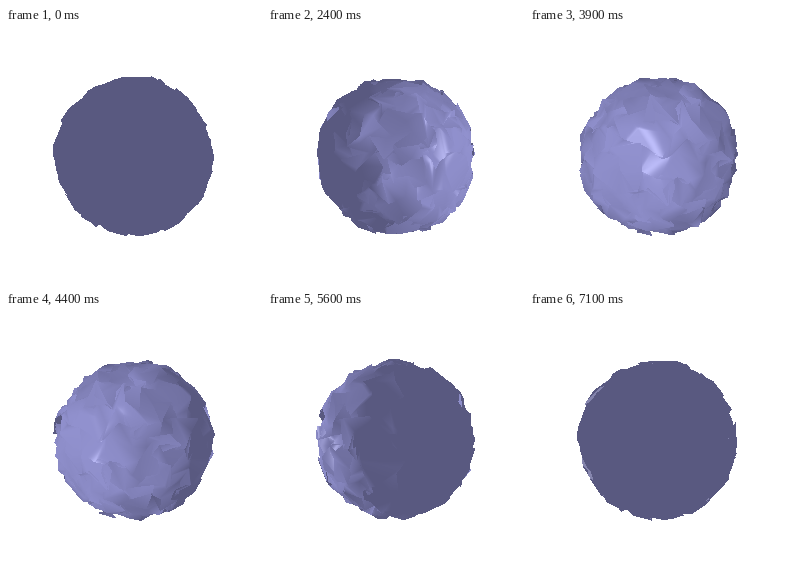
Recreate the animation shown at these times as an HTML page with a canvas. Size 256 px wide and 256 px high, loop 7.2 s.

```html
<!DOCTYPE html>
<html>
<head>
<meta charset="utf-8">
<style>
html, body { margin: 0; width: 100%; height: 100%; overflow: hidden; background: #fff; }
canvas { display: block; width: 100vmin; height: 100vmin; }
</style>
</head>
<body>
<canvas id="stage" width="256" height="256"></canvas>
<script>
const SIZE = 256, LOOP = 7200, STEP = 100;
const DETAIL = 10, RADIUS = 74.5, ROUGH = 9, SCATTER = 0.3, CAMERA = 300;
const AMBIENT = [89, 89, 128], DIFFUSE = [56, 56, 78], SHINE = 45;

const ctx = document.getElementById('stage').getContext('2d');
const image = ctx.createImageData(SIZE, SIZE);
const depth = new Float32Array(SIZE * SIZE);

let seed = 41;
function random() {
  seed = (seed + 0x6d2b79f5) | 0;
  let n = Math.imul(seed ^ (seed >>> 15), 1 | seed);
  n = (n + Math.imul(n ^ (n >>> 7), 61 | n)) ^ n;
  return ((n ^ (n >>> 14)) >>> 0) / 4294967296;
}

const dot = (a, b) => a[0] * b[0] + a[1] * b[1] + a[2] * b[2];
const sub = (a, b) => a.map((v, i) => v - b[i]);
const unit = a => { const l = Math.hypot(...a) || 1; return a.map(v => v / l); };
const cross = (a, b) => [
  a[1] * b[2] - a[2] * b[1],
  a[2] * b[0] - a[0] * b[2],
  a[0] * b[1] - a[1] * b[0]
];

// Geodesic sphere with scattered points, so that its triangles overlap like flakes
const points = [], normals = [], faces = [], known = new Map();

function addPoint(p) {
  const dir = unit(p);
  const key = dir.map(v => Math.round(v * 1000)).join();
  if (!known.has(key)) {
    const shifted = unit(dir.map(v => v + (random() - 0.5) * SCATTER));
    const r = RADIUS + (random() - 0.5) * ROUGH;
    known.set(key, points.length);
    points.push(shifted.map(v => v * r));
    normals.push([0, 0, 0]);
  }
  return known.get(key);
}

function addFace(a, b, c) {
  const n = cross(sub(points[b], points[a]), sub(points[c], points[a]));
  const s = dot(n, points[a]) < 0 ? -1 : 1;
  for (const i of [a, b, c]) normals[i] = normals[i].map((v, k) => v + n[k] * s);
  faces.push([a, b, c]);
}

function buildMesh() {
  const g = (1 + Math.sqrt(5)) / 2, corners = [];
  for (const a of [-1, 1]) for (const b of [-g, g])
    corners.push([0, a, b], [a, b, 0], [b, 0, a]);
  const near = (a, b) => Math.hypot(...sub(a, b)) < 2.1;
  for (let i = 0; i < 12; i++) for (let j = i + 1; j < 12; j++) for (let k = j + 1; k < 12; k++) {
    const [a, b, c] = [corners[i], corners[j], corners[k]];
    if (!near(a, b) || !near(b, c) || !near(a, c)) continue;
    const at = (u, v) => addPoint(a.map((x, m) =>
      (x * (DETAIL - u - v) + b[m] * u + c[m] * v) / DETAIL));
    for (let u = 0; u < DETAIL; u++) for (let v = 0; u + v < DETAIL; v++) {
      addFace(at(u, v), at(u + 1, v), at(u, v + 1));
      if (u + v < DETAIL - 1) addFace(at(u + 1, v), at(u + 1, v + 1), at(u, v + 1));
    }
  }
  normals.forEach((n, i) => { normals[i] = unit(n); });
}

// Both sides of a flake are lit: its normal always faces the viewer
function shade(o, x, y, z, lx, lz) {
  const len = (Math.hypot(x, y, z) || 1) * (z < 0 ? -1 : 1);
  const lit = Math.max(0, (x * lx + z * lz) / len);
  const mirror = lit > 0 ? Math.max(0, 2 * lit * z / len - lz) : 0;
  const gloss = SHINE * Math.pow(mirror, 50);
  for (let k = 0; k < 3; k++) image.data[o + k] = AMBIENT[k] + DIFFUSE[k] * lit + gloss;
}

function fillFace(a, b, c, na, nb, nc, lx, lz) {
  const area = (b[0] - a[0]) * (c[1] - a[1]) - (b[1] - a[1]) * (c[0] - a[0]);
  if (Math.abs(area) < 1e-6) return;
  const x0 = Math.floor(Math.min(a[0], b[0], c[0])), x1 = Math.ceil(Math.max(a[0], b[0], c[0]));
  const y0 = Math.floor(Math.min(a[1], b[1], c[1])), y1 = Math.ceil(Math.max(a[1], b[1], c[1]));
  for (let y = y0; y < y1; y++) for (let x = x0; x < x1; x++) {
    const px = x + 0.5, py = y + 0.5;
    const v = ((px - a[0]) * (c[1] - a[1]) - (py - a[1]) * (c[0] - a[0])) / area;
    const w = ((b[0] - a[0]) * (py - a[1]) - (b[1] - a[1]) * (px - a[0])) / area;
    const u = 1 - v - w;
    if (u < 0 || v < 0 || w < 0) continue;
    const z = u * a[2] + v * b[2] + w * c[2], i = y * SIZE + x;
    if (z <= depth[i]) continue;
    depth[i] = z;
    shade(i * 4,
      u * na[0] + v * nb[0] + w * nc[0],
      u * na[1] + v * nb[1] + w * nc[1],
      u * na[2] + v * nb[2] + w * nc[2], lx, lz);
  }
}

function draw(time) {
  const angle = (0.5 - time / LOOP) * 2 * Math.PI;
  const s = Math.sin(angle), c = Math.cos(angle);
  const turn = p => [p[0] * c + p[2] * s, p[1], p[2] * c - p[0] * s];
  const turned = normals.map(turn);
  const screen = points.map(p => {
    const [x, y, z] = turn(p), k = CAMERA / (CAMERA - z);
    return [128 + x * k, 128 - y * k, k];
  });
  image.data.fill(255);
  depth.fill(0);
  for (const [i, j, k] of faces)
    fillFace(screen[i], screen[j], screen[k], turned[i], turned[j], turned[k], s, c);
  ctx.putImageData(image, 0, 0);
}

buildMesh();
let shown = -1;
function tick() {
  const step = Math.floor(performance.now() % LOOP / STEP);
  if (step !== shown) draw((shown = step) * STEP);
  requestAnimationFrame(tick);
}
tick();
</script>
</body>
</html>
```
